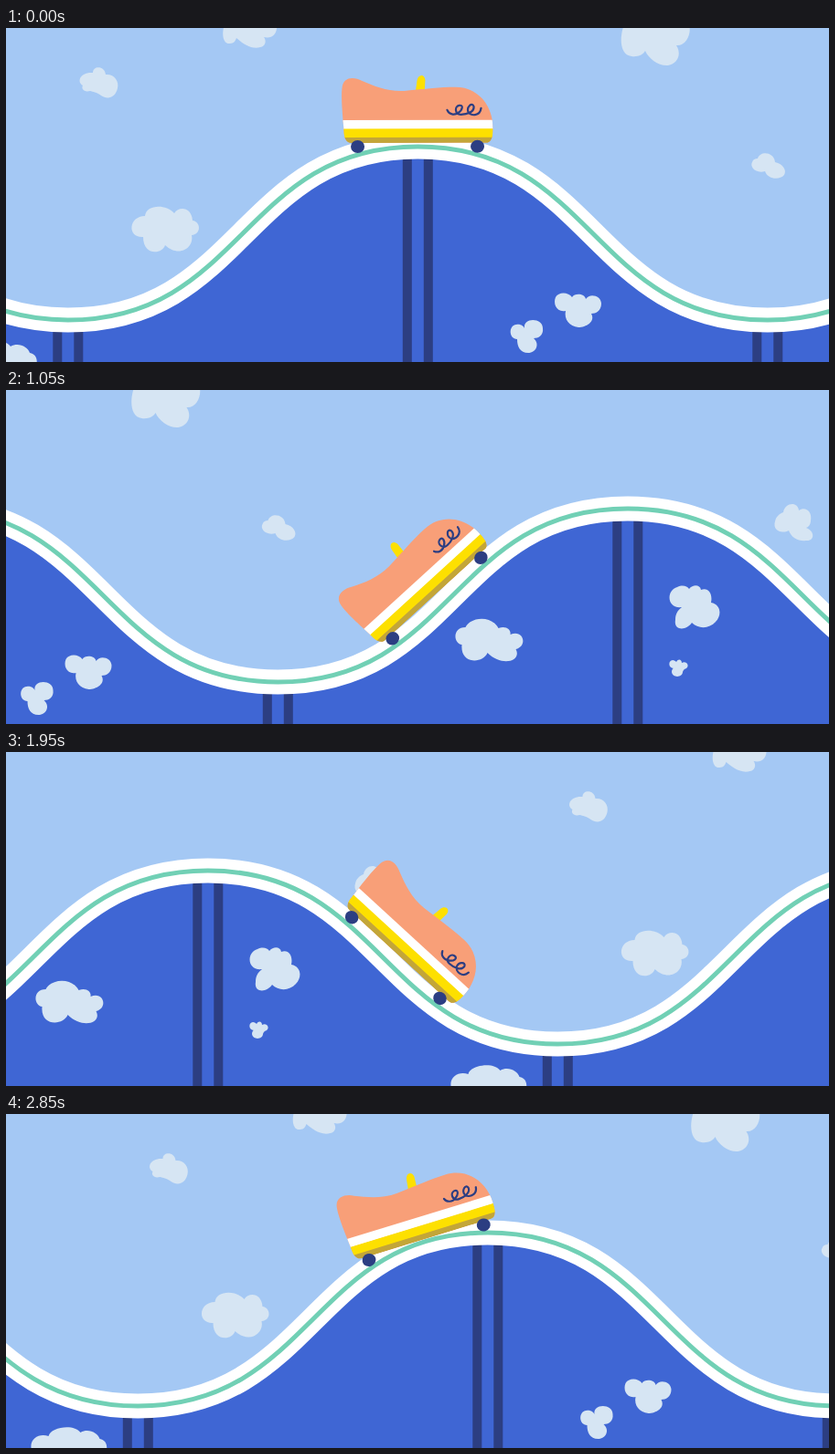
Write an HTML page that moves like this. It is 900 px wide and 366 px high and loops after 3000 ms.

```html
<!DOCTYPE html>
<html lang="en">
<head>
<meta charset="utf-8">
<title>Roller coaster</title>
<style>
  html, body { margin: 0; width: 100%; height: 100%; overflow: hidden; background: #a4c8f4; }
  svg { display: block; width: 900px; height: 366px; }
  .cloud { fill: #d6e5f3; }
  .navy { fill: #2c3e82; }
  .line { fill: none; }
</style>
</head>
<body>
<svg viewBox="0 0 900 366">
  <defs>
    <path id="body" d="M369 101C368 88 367 74 368 66C369 53 381 53 390 58C404 64 418 70 436 69C460 67 475 65 492 65C517 65 533 85 533 110C533 120 531 126 525 126L379 126C372 126 370 120 370 112Z"/>
    <clipPath id="hull"><use href="#body"/></clipPath>
  </defs>
  <rect width="900" height="366" fill="#a4c8f4"/>
  <g id="world">
    <path id="ground" fill="#3f66d4"/>
    <g id="clouds" class="cloud">
      <path d="M95 49C95 41 108 41 109 51C118 50 124 58 122 66C119 78 110 78 104 74C99 70 95 70 92 69C85 71 82 66 84 63C77 59 81 48 95 49Z"/>
      <path d="M239-4C235 8 238 18 245 17C249 17 251 14 252 11C258 16 268 24 278 21C284 20 285 14 282 10C292 12 297 6 296-4Z"/>
      <path d="M676-4C670 12 672 30 684 31C691 32 697 29 699 25C703 34 714 42 724 41C735 39 739 28 733 19C744 20 750 6 747-4Z"/>
      <path d="M822 143C825 134 840 136 841 147C850 149 854 156 851 161C846 167 833 166 830 157C820 160 813 152 816 147C817 144 819 143 822 143Z"/>
      <path d="M152 206C153 194 174 192 184 203C189 195 203 196 204 211C213 212 214 226 203 227C206 241 189 252 174 238C171 248 150 250 150 229C132 230 134 206 152 206Z"/>
      <path d="M567 329C565 317 587 317 587 329C588 337 582 340 577 340C584 346 580 356 571 356C562 356 559 349 559 341C550 341 549 326 558 325C563 324 566 327 567 329Z"/>
      <path d="M619 295C622 290 633 291 634 297C638 290 651 293 651 302C651 310 645 313 640 313C645 322 634 328 626 328C616 327 610 319 612 310C602 312 598 302 601 295C604 289 615 289 619 295Z"/>
      <path d="M-48 370C-53 356-40 349-30 353C-28 343-2 339 5 349C13 344 24 349 26 356C33 357 35 364 33 370Z"/>
      <path transform="translate(306)" d="M732 260C737 249 760 246 768 261C777 258 782 263 781 268C796 262 800 281 787 284C794 297 772 304 756 288C751 300 726 301 728 279C718 277 718 260 732 260Z"/>
      <path transform="translate(535.5)" d="M747 218C751 213 759 213 760 219C768 216 773 223 771 233C782 235 783 247 776 254C769 262 757 262 750 255C744 264 730 264 732 252C732 246 734 242 739 238C722 240 722 219 734 216C740 213 745 215 747 218Z"/>
      <path transform="translate(535.5)" d="M733 298C735 294 739 295 739 299C744 296 748 302 744 305C741 306 741 307 740 309C740 315 729 316 728 309C728 307 729 305 730 305C724 305 724 296 729 296C731 296 732 297 733 298Z"/>
      <path transform="translate(688.5)" d="M697 134C699 123 713 122 714 132C721 127 729 133 727 143C727 147 725 150 722 151C731 154 732 165 723 165C713 166 706 162 703 154C695 158 685 154 688 144C689 139 692 136 697 134Z"/>
    </g>
    <use href="#clouds" x="1530"/>
    <path id="pillars" class="navy"/>
    <path id="track" class="line" stroke="#fff" stroke-width="27"/>
    <path id="rail" class="line" stroke="#71d0b5" stroke-width="5"/>
  </g>
  <g id="car">
    <g transform="translate(-450.5 -130)">
      <path fill="#fde000" d="M448 73L450 58C451 51 458 50 459 57L458 73Z"/>
      <g clip-path="url(#hull)">
        <rect x="360" y="45" width="180" height="90" fill="#f89f78"/>
        <rect x="360" y="101" width="180" height="10" fill="#fff"/>
        <rect x="360" y="110.5" width="180" height="10" fill="#fde000"/>
        <rect x="360" y="120" width="180" height="8" fill="#c3a638"/>
      </g>
      <path class="line" stroke="#2c3e82" stroke-width="2.2" stroke-linecap="round" d="M483 90C485 95 491 96 495 93C500 90 501 84 496 85C491 86 491 95 498 95C505 95 513 92 512 86C510 81 504 87 506 92C508 97 519 97 520 88"/>
      <ellipse class="navy" cx="385" cy="130" rx="7.5" ry="7"/>
      <ellipse class="navy" cx="516" cy="130" rx="7.5" ry="7"/>
    </g>
  </g>
</svg>
<script>
const $ = id => document.getElementById(id);
const LOOP = 3000, STEP = 150, SPEED = 0.51;
const HALF = 382.5, TOP = 130, DROP = 190, PEAK = 450.3;
const AXLE = 131, LIFT = 8.5, PIVOT = 35;

// Alternating crests and dips, one bezier per half wave
const start = PEAK - 2 * HALF, waves = 8;
let d = `M${start} ${TOP}`, posts = '';
for (let i = 0; i < waves; i++) {
  const rise = i % 2 ? -DROP : DROP;
  d += `c${HALF / 2} 0 ${HALF / 2} ${rise} ${HALF} ${rise}`;
  const x = start + i * HALF, y = i % 2 ? TOP + DROP : TOP;
  for (const dx of [-16.5, 6.5]) posts += `M${x + dx} ${y}h10V366h-10z`;
}
$('track').setAttribute('d', d);
$('rail').setAttribute('d', d);
$('ground').setAttribute('d', `${d}V366H${start}z`);
$('pillars').setAttribute('d', posts);

// Wheel centre above the rail; u counts half waves from a crest
function wheel(u) {
  const i = Math.floor(u), t = u - i, odd = i & 1;
  const ease = t * t * (3 - 2 * t);
  const dx = HALF * (1.5 - 3 * t + 3 * t * t);
  const dy = (odd ? -1 : 1) * DROP * 6 * t * (1 - t);
  const len = Math.hypot(dx, dy);
  return {
    x: HALF * (i + 1.5 * t * (1 - t) + t ** 3) + LIFT * dy / len,
    y: TOP + DROP * (odd ? 1 - ease : ease) - LIFT * dx / len
  };
}

function solve(f, lo, hi) {
  for (let i = 0; i < 30; i++) {
    const mid = (lo + hi) / 2;
    if (f(mid) < 0) lo = mid; else hi = mid;
  }
  return (lo + hi) / 2;
}

// Both wheels on the rail, the rear one at u
function pose(u) {
  const a = wheel(u);
  const b = wheel(solve(v => {
    const p = wheel(v);
    return Math.hypot(p.x - a.x, p.y - a.y) - AXLE;
  }, u, u + 1));
  const angle = Math.atan2(b.y - a.y, b.x - a.x);
  const x = (a.x + b.x) / 2, y = (a.y + b.y) / 2;
  return { x, y, angle, mid: x + PIVOT * Math.sin(angle) };
}

function draw(now) {
  const t = Math.floor(now % LOOP / STEP) * STEP;
  const shift = t * SPEED;
  const phase = t / LOOP * 2 % 1;
  const lag = 3 * Math.max(0, -Math.sin(phase * 2 * Math.PI)) ** 3;
  const goal = 450 - PEAK + shift - lag;
  const near = goal / HALF;
  const p = pose(solve(u => pose(u).mid - goal, near - 0.8, near + 0.4));
  $('world').setAttribute('transform', `translate(${-shift})`);
  $('car').setAttribute('transform',
    `translate(${p.x + PEAK - shift} ${p.y}) rotate(${p.angle * 180 / Math.PI})`);
}

let begin;
function tick(now) {
  begin ??= now;
  draw(Math.max(0, now - begin));
  requestAnimationFrame(tick);
}
draw(0);
requestAnimationFrame(tick);
</script>
</body>
</html>
```
